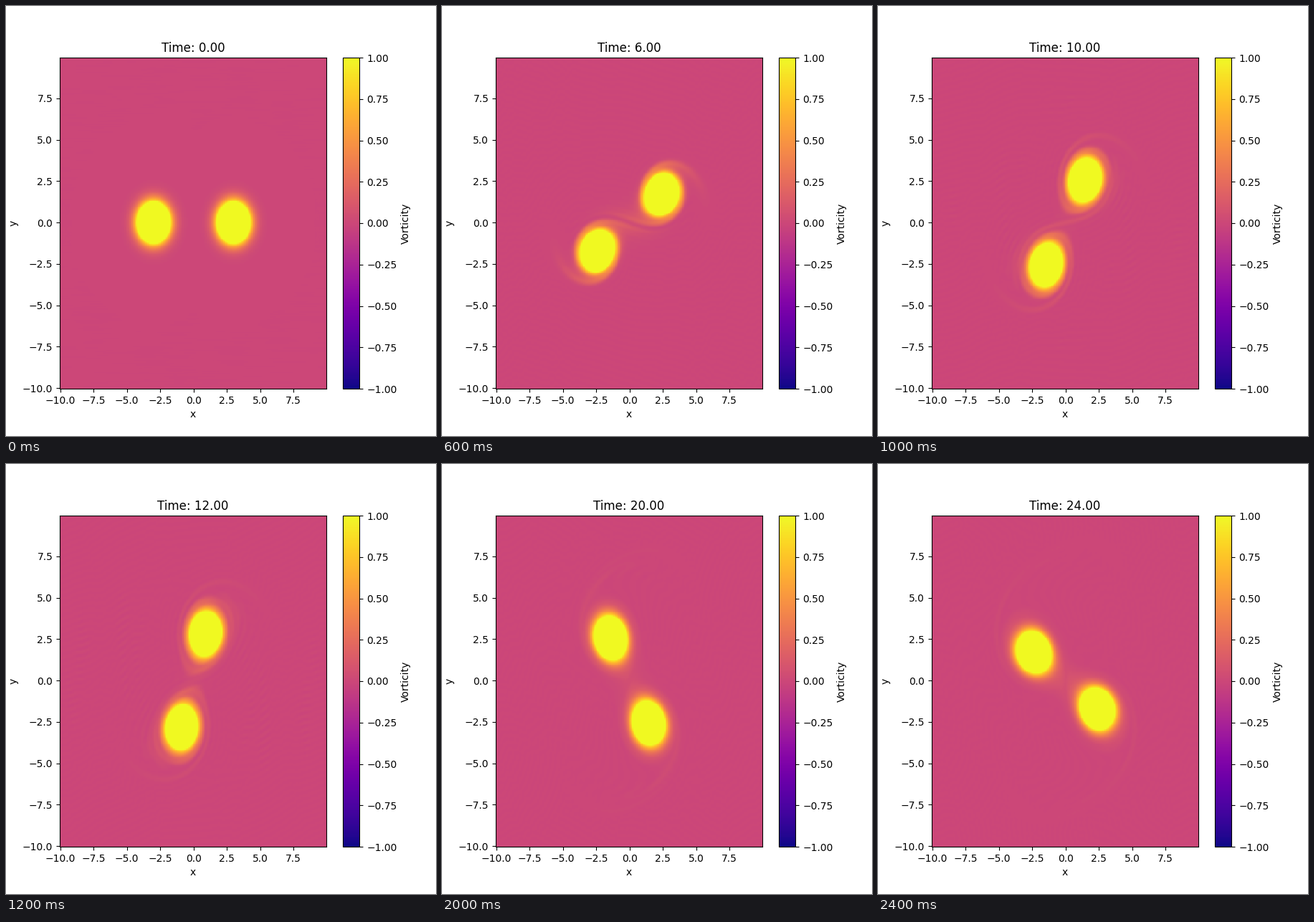
Animation of 600 by 600 pixels, one loop 2600 ms. Source, as a matplotlib script:

```python
import numpy as np
import matplotlib.pyplot as plt
from matplotlib.animation import FuncAnimation

LENGTH = 20.0
N_SIM, N_PLOT = 160, 256
VISCOSITY = 0.001
FRAMES, INTERVAL = 13, 200
FRAME_TIME, STEPS_PER_FRAME = 2.0, 32
DT = FRAME_TIME / STEPS_PER_FRAME


def periodic_axis(n):
    return np.linspace(-LENGTH / 2, LENGTH / 2, n, endpoint=False)


# Spectral operators on the simulation grid
HALF = N_SIM // 2
wave = 2 * np.pi * np.fft.fftfreq(N_SIM, LENGTH / N_SIM)
KX, KY = np.meshgrid(np.abs(wave[:HALF + 1]), wave)
K2 = KX**2 + KY**2
INV_K2 = 1 / np.where(K2 == 0, np.inf, K2)
DEALIAS = K2 < (np.abs(wave).max() * 2 / 3)**2

U_OP, V_OP = 1j * KY * INV_K2, -1j * KX * INV_K2
DX_OP, DY_OP = -1j * KX * DEALIAS, -1j * KY * DEALIAS
DIFFUSION = -VISCOSITY * K2


def to_grid(spectrum):
    return np.fft.irfft2(spectrum, s=(N_SIM, N_SIM))


def to_plot_grid(spectrum):
    """Interpolate onto the finer plotting grid by zero padding."""
    padded = np.zeros((N_PLOT, N_PLOT // 2 + 1), dtype=complex)
    padded[:HALF, :HALF] = spectrum[:HALF, :HALF]
    padded[-HALF:, :HALF] = spectrum[-HALF:, :HALF]
    return np.fft.irfft2(padded, s=(N_PLOT, N_PLOT)) * (N_PLOT / N_SIM)**2


def rate(w_hat):
    """Time derivative of the vorticity spectrum (advection and diffusion)."""
    w = to_grid(w_hat)
    flux_x = np.fft.rfft2(to_grid(U_OP * w_hat) * w)
    flux_y = np.fft.rfft2(to_grid(V_OP * w_hat) * w)
    return DX_OP * flux_x + DY_OP * flux_y + DIFFUSION * w_hat


def rk4_step(w_hat):
    k1 = rate(w_hat)
    k2 = rate(w_hat + DT / 2 * k1)
    k3 = rate(w_hat + DT / 2 * k2)
    k4 = rate(w_hat + DT * k3)
    return w_hat + DT / 6 * (k1 + 2 * k2 + 2 * k3 + k4)


def simulate(strength=5.0, offset=3.0):
    x, y = np.meshgrid(periodic_axis(N_SIM), periodic_axis(N_SIM))
    w = sum(strength * np.exp(-(x - x0)**2 - y**2) for x0 in (-offset, offset))
    w_hat = np.fft.rfft2(w) * DEALIAS
    fields = [to_plot_grid(w_hat)]
    for _ in range(FRAMES - 1):
        for _ in range(STEPS_PER_FRAME):
            w_hat = rk4_step(w_hat)
        fields.append(to_plot_grid(w_hat))
    return fields


fields = simulate()

fig, ax = plt.subplots(figsize=(6, 6), dpi=100)
axis = periodic_axis(N_PLOT)
mesh = ax.pcolormesh(axis, axis, fields[0], cmap="plasma", vmin=-1, vmax=1,
                     shading="nearest")
fig.colorbar(mesh, ax=ax, label="Vorticity")
ax.set_xlabel("x")
ax.set_ylabel("y")
title = ax.set_title("Time: 0.00")


def update(frame):
    mesh.set_array(fields[frame])
    title.set_text(f"Time: {frame * FRAME_TIME:.2f}")
    return mesh, title


anim = FuncAnimation(fig, update, frames=FRAMES, interval=INTERVAL,
                     repeat=True, repeat_delay=0)
plt.show()
```
